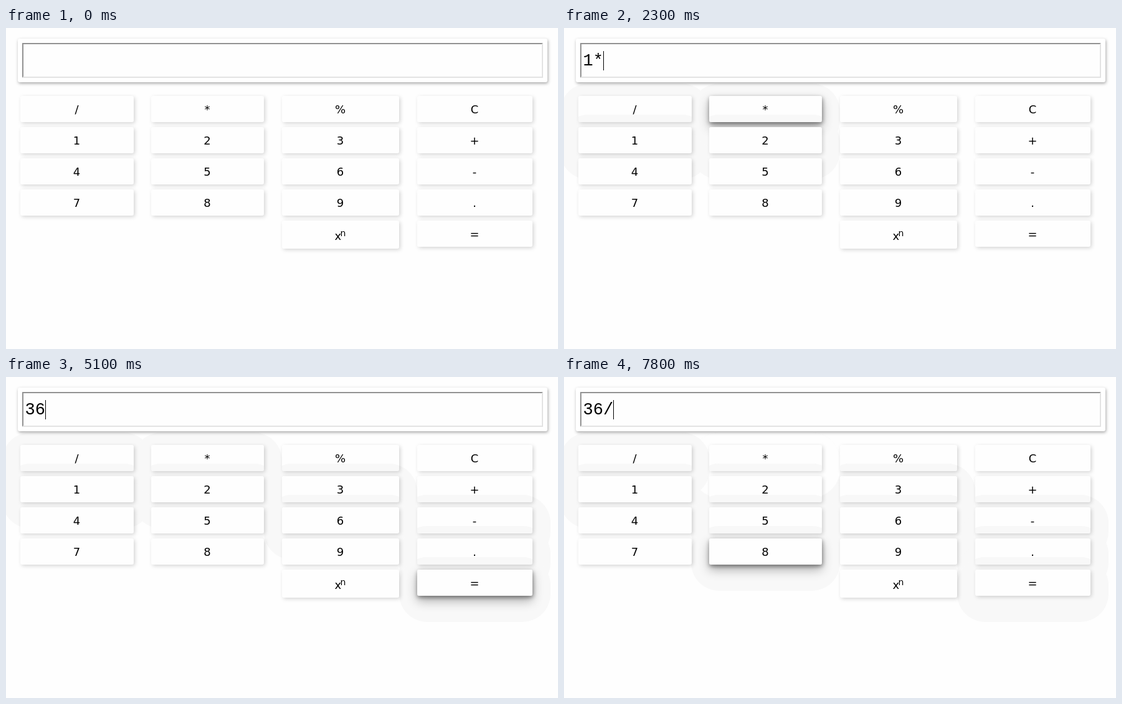
Animation, 886 px wide and 515 px high, one loop 8000 ms. Source, as an HTML page with a canvas:

```html
<!DOCTYPE html>
<html lang="en">
<head>
<meta charset="utf-8">
<title>Calculator</title>
<style>
html, body { margin: 0; height: 100%; overflow: hidden; background: #fefefe; }
canvas { display: block; }
</style>
</head>
<body>
<canvas id="stage" width="886" height="515"></canvas>
<script>
const W = 886, H = 515, LOOP = 8000, PAPER = '#fefefe', HALO = '#f8f8f8';
const ctx = document.getElementById('stage').getContext('2d');

const columns = [[23, 182], [233, 181], [443, 188], [660, 185]];
const keys = {};
['/*%C', '123+', '456-', '789.', '  x='].forEach((line, row) =>
  [...line].forEach((label, col) => {
    if (label === ' ') return;
    const [x, w] = columns[col];
    keys[label] = { label, row, x, w, y: 109 + row * 50, h: label === 'x' ? 45 : 42 };
  }));
const keyList = Object.values(keys);

// Pointer path: time, key under the pointer, key whose halo is wiped
const hovers = [
  [800, '/'], [1100, '1'], [1800, '2'], [2000, '*'], [2400, ''], [2500, '3'],
  [3100, '6'], [4000, '-'], [4300, '.'], [4600, '='], [5600, ''], [5700, '6'],
  [5900, '3'], [6000, '2'], [6100, '*'], [6400, '', '*'], [6600, '/'],
  [7000, '5'], [7100, '8']
];
const readouts = [
  [0, ''], [1500, '1'], [2300, '1*'], [2900, '1*3'], [3300, '1*36'],
  [5000, '36'], [6800, '36/']
];
const caretFlips = [
  [0, false], [1500, true], [2000, false], [2300, true], [2700, false],
  [2900, true], [3800, false], [4300, true], [4800, false], [5000, true],
  [5400, false], [5900, true], [6400, false], [6800, true], [7300, false],
  [7800, true]
];
const valueAt = (list, t) => list.findLast(step => step[0] <= t)?.[1];

function box(x, y, w, h, r, color) {
  ctx.fillStyle = color;
  ctx.beginPath();
  ctx.roundRect(x, y, w, h, r);
  ctx.fill();
}

// Draws only outside the given boxes
function outside(boxes, draw) {
  ctx.save();
  for (const b of boxes) {
    ctx.beginPath();
    ctx.rect(0, 0, W, H);
    ctx.roundRect(b.x, b.y, b.w, b.h, 3);
    ctx.clip('evenodd');
  }
  draw();
  ctx.restore();
}

function shadow(b, dx, dy, blur, alpha) {
  ctx.shadowOffsetX = dx;
  ctx.shadowOffsetY = dy;
  ctx.shadowBlur = blur;
  ctx.shadowColor = `rgba(0,0,0,${alpha})`;
  box(b.x, b.y, b.w, b.h, 3, '#fff');
}

const coveringKeys = key => keyList.filter(k => k.row >= key.row);

function halo(key, color) {
  outside(coveringKeys(key), () =>
    box(key.x - 29, key.y - 20, key.w + 58, key.h + 62, 45, color));
}

function text(str, x, y, size, align = 'center', family = '"DejaVu Sans", sans-serif') {
  ctx.font = `${size}px ${family}`;
  ctx.textAlign = align;
  ctx.fillStyle = '#000';
  ctx.fillText(str, x, y);
}

function keypad(t) {
  for (const k of keyList) box(k.x, k.y, k.w, k.h, 3, PAPER);
  for (const [time, label, wiped] of hovers) {
    if (time > t) break;
    if (label) halo(keys[label], HALO);
    if (wiped) halo(keys[wiped], PAPER);
  }
  for (const k of keyList) outside([k], () => shadow(k, 2, 2, 6, 0.17));

  const active = keys[valueAt(hovers, t)];
  if (active) outside(coveringKeys(active), () => {
    shadow(active, 0, 8, 17, 0.3);
    shadow(active, 0, 3, 6, 0.28);
  });

  for (const k of keyList) {
    const cx = k.x + k.w / 2 - 0.5;
    if (k.label === 'x') {
      text('x', 527.5, 340, 18, 'left');
      text('n', 536.5, 334, 14, 'left');
    } else {
      text(k.label, cx, k.y + 28, 18);
    }
  }
}

function bevel(points, color) {
  ctx.fillStyle = color;
  ctx.beginPath();
  for (const [x, y] of points) ctx.lineTo(x, y);
  ctx.fill();
}

function display(t) {
  ctx.save();
  shadow({ x: 19, y: 17, w: 850, h: 70 }, 1, 2, 5, 0.35);
  ctx.restore();
  bevel([[26, 80], [26, 24], [862, 24], [860, 26], [28, 26], [28, 78]], '#929292');
  bevel([[26, 80], [862, 80], [862, 24], [860, 26], [860, 78], [28, 78]], '#e3e3e3');
  ctx.fillStyle = PAPER;
  ctx.fillRect(28, 26, 832, 52);

  const str = valueAt(readouts, t);
  text(str, 30.5, 60, 27, 'left', '"Liberation Mono", "Courier New", monospace');
  if (valueAt(caretFlips, t)) ctx.fillRect(Math.round(30.6 + str.length * 16.25), 37, 1, 31);
}

function frame(now) {
  const t = now % LOOP;
  ctx.fillStyle = PAPER;
  ctx.fillRect(0, 0, W, H);
  keypad(t);
  display(t);
  requestAnimationFrame(frame);
}
frame(performance.now());
</script>
</body>
</html>
```
